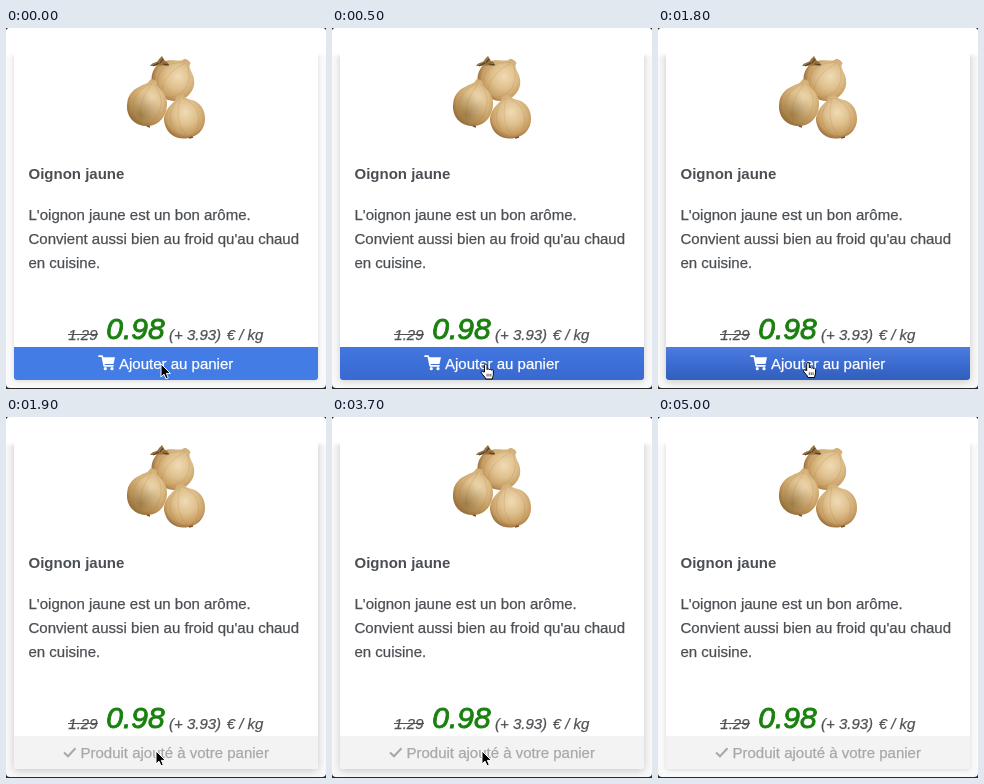
Write an HTML page that moves like this. It is 320 by 361 pixels and loops after 5.2 s.

```html
<!DOCTYPE html>
<html lang="fr">
<head>
<meta charset="utf-8">
<title>Oignon jaune</title>
<style>
  html, body { margin: 0; width: 100%; height: 100%; overflow: hidden; background: #2b2b2b; }
  #stage { position: absolute; left: 0; top: 0; width: 320px; height: 360px; overflow: hidden; border-radius: 4px; background: #f9f9f9; }
  #stage > * { position: absolute; }
  #card { left: 7.5px; top: -20px; width: 304.5px; height: 371.5px; border-radius: 3px; background: #fff; }
  #header { left: 0; top: 0; width: 320px; height: 30px; background: linear-gradient(#fff 25px, #fff0); }
  #button { left: 7.5px; top: 319px; width: 304.5px; height: 32.5px; border-radius: 0 0 3px 3px; overflow: hidden; }
  #sheen { height: 100%; background: linear-gradient(#ffffff14, #00000012 60%, #00102830); }
  svg { left: 0; top: 0; }
  text { font: 15px "Liberation Sans", Arial, sans-serif; fill: #4b4f54; stroke: #4b4f54; stroke-width: .25; white-space: pre; }
  .bold { font-weight: bold; stroke: none; }
  .price text { font-style: italic; fill: #505356; stroke: #505356; }
  .price .now { font-size: 30px; fill: #1a800f; stroke: #1a800f; stroke-width: .9; }
  #add text { fill: #fff; stroke: #fff; }
  #done text { fill: #a8a8a8; stroke: #a8a8a8; }
</style>
</head>
<body>
<div id="stage">
  <div id="card"></div>
  <div id="header"></div>
  <div id="button"><div id="sheen"></div></div>
  <svg width="320" height="361" viewBox="0 0 320 361">
    <defs>
      <radialGradient id="skin" cx=".55" cy=".42" r=".62">
        <stop offset="0" stop-color="#f0dbb4"/>
        <stop offset=".45" stop-color="#dfc08d"/>
        <stop offset=".8" stop-color="#c79d62"/>
        <stop offset="1" stop-color="#94693a"/>
      </radialGradient>
      <radialGradient id="shade" cx=".35" cy=".7" r=".6">
        <stop offset="0" stop-color="#80602a" stop-opacity=".6"/>
        <stop offset="1" stop-color="#80602a" stop-opacity="0"/>
      </radialGradient>
      <g id="onion">
        <path d="M-3-24C0-25 2-25 4-24C4-20 7-19 12-16C18-12 21-6 20.5 1C20 12 12 20 0 20C-12 20-20 12-20.5 1C-21-6-17-12-11-16C-7-19-4-20-3-24Z" fill="url(#skin)"/>
        <g fill="none" stroke="#96672f" stroke-width=".6" opacity=".25">
          <path d="M-1-21C-7-16-15-10-14 2C-13 11-8 17-1 19"/>
          <path d="M0-21C-3-14-6-8-6 3C-5 11-3 16 0 19"/>
          <path d="M2-21C8-16 15-10 14 2C13 11 8 17 1 19"/>
        </g>
      </g>
    </defs>

    <use href="#onion" transform="translate(167 52) rotate(36) scale(1.06 1)"/>
    <path d="M144 38C147 33 151 36 153 31L156 28L159 33C162 34 164 36 161 38C155 37 150 38 144 38Z" fill="#97713f"/>
    <path d="M147 38L153 35M154 35L157 31M157 36L163 37" stroke="#4e3d22" stroke-width="1.1"/>
    <use href="#onion" transform="translate(141 77) rotate(14) scale(.97 1.06)"/>
    <ellipse cx="140" cy="79" rx="18" ry="19" fill="url(#shade)"/>
    <use href="#onion" transform="translate(178.5 90.5) rotate(-12)"/>
    <path d="M141 98l3 1M183 110l4-1" stroke="#795224" stroke-width="1.4"/>

    <text class="bold" x="22.5" y="151">Oignon jaune</text>
    <text x="22.5" y="191.5">L'oignon jaune est un bon arôme.</text>
    <text x="22.5" y="215.5">Convient aussi bien au froid qu'au chaud</text>
    <text x="22.5" y="239.5">en cuisine.</text>

    <g class="price">
      <text x="62.3" y="311.7">1.29</text>
      <path d="M62 306.5H92" stroke="#505356"/>
      <text class="now" x="100.3" y="311.3">0.98</text>
      <text x="163" y="311.7">(+ 3.93)</text>
      <text x="220.7" y="311.7">€ / kg</text>
    </g>

    <g id="add">
      <path d="M93 328.2H96.2L98.2 337.8H107" fill="none" stroke="#fff" stroke-width="1.7" stroke-linecap="round" stroke-linejoin="round"/>
      <path d="M96.5 329.3H109L107.5 336H98Z" fill="#fff"/>
      <circle cx="99.3" cy="340.7" r="1.6" fill="#fff"/>
      <circle cx="106" cy="340.7" r="1.6" fill="#fff"/>
      <text x="113" y="340.5">Ajouter au panier</text>
    </g>
    <g id="done">
      <path d="M58 335.5L62 339.3L69.5 331.3" fill="none" stroke="#a8a8a8" stroke-width="2"/>
      <text x="74.5" y="340.5">Produit ajouté à votre panier</text>
    </g>

    <g id="cursor">
      <path id="arrow" d="M0 0V13L3 10.2L5 14.8L7.3 13.8L5.3 9.4H9.4Z" fill="#000" stroke="#fff"/>
      <g id="hand" transform="translate(-5.3 0)" stroke="#000">
        <path d="M4 8.5V1.8a1.3 1.3 0 0 1 2.6 0V6a1.2 1.2 0 0 1 2.2.2a1.2 1.2 0 0 1 2.1.5a1.1 1.1 0 0 1 2 .8V11c0 1.5-1 2.5-1 4.5H5.3C5 13.5 2 11.5.9 9.3c-.6-1.3.8-1.9 1.7-1Z" fill="#fff"/>
        <path d="M6.6 10.3V13M8.5 10.3V13M10.4 10.3V13" stroke-width=".7"/>
      </g>
    </g>
  </svg>
</div>
<script>
  const LOOP = 5200, STEP = 100;
  const $ = id => document.getElementById(id);
  const show = (id, on) => { $(id).style.display = on ? "" : "none"; };

  // Each row: time, then values
  const PATH = [[0, 155, 336], [400, 155, 336], [800, 150, 334], [4300, 150, 334], [4600, 150, 341], [5000, 152, 364]];
  const BLUE = [[0, 67, 124, 228], [100, 67, 124, 228], [500, 61, 113, 221]];
  const SHEEN = [[0, 0], [300, 0], [800, 1], [1600, 1], [1800, 1.15]];
  const LIFT = [[0, 0], [200, 0], [700, 1], [4500, 1], [5000, 0]];

  function at(rows, t) {
    const i = rows.findIndex(r => r[0] > t);
    if (i < 0) return rows[rows.length - 1].slice(1);
    const a = rows[i - 1], b = rows[i];
    const k = (t - a[0]) / (b[0] - a[0]);
    return a.slice(1).map((v, j) => v + (b[j + 1] - v) * k);
  }

  function draw(t) {
    const added = t >= 1900;
    const hand = t >= 100 && !added;
    const [x, y] = at(PATH, t);
    const [lift] = at(LIFT, t);

    $("cursor").setAttribute("transform", `translate(${x} ${y})`);
    show("arrow", !hand);
    show("hand", hand);
    show("add", !added);
    show("done", added);
    show("cursor", t < 5000);

    $("button").style.background = added ? "#f3f3f3" : `rgb(${at(BLUE, t)})`;
    $("sheen").style.opacity = added ? 0 : at(SHEEN, t)[0];
    $("card").style.boxShadow =
      `0 ${1 + lift}px ${4 + 5 * lift}px rgba(0,0,0,${0.13 + 0.07 * lift})`;
  }

  function tick() {
    const t = performance.now() % LOOP;
    draw(Math.floor(t / STEP) * STEP);
    requestAnimationFrame(tick);
  }
  tick();
</script>
</body>
</html>
```
